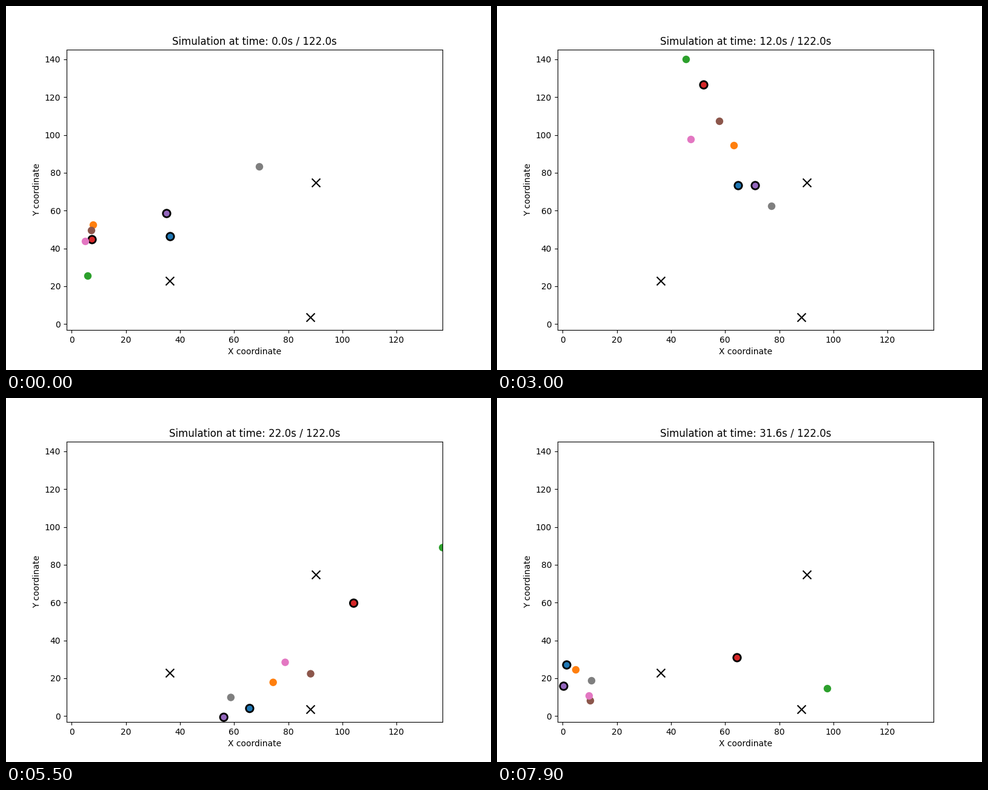
Recreate the animation shown at these times as a matplotlib script. Size 800x600 px, loop 8000 ms.

```python
import numpy as np
import matplotlib.pyplot as plt
from matplotlib.animation import FuncAnimation

FRAMES, INTERVAL = 80, 100
DT, T_END = 0.4, 122.0
XLIM, YLIM = (-1.9, 137), (-3.1, 145.1)
TARGETS = [(90.25, 74.75), (36.25, 22.75), (88.2, 3.6)]

# Each agent sweeps clockwise through a few waypoints (stage pixels)
KNOTS = np.array([0, 19, 30, 40, 48, 62, 79])
ROUTES = {
    "tab:blue": "271,380 286,305 398,296 477,369 461,465 322,518 115,440",
    "tab:orange": "144,361 197,230 391,230 507,304 492,397 368,508 130,448",
    "tab:green": "135,445 138,174 312,88 593,95 705,152 690,347 545,479",
    "tab:red": "142,385 163,162 341,130 525,156 576,236 543,423 396,428",
    "tab:purple": "265,342 333,292 426,296 475,381 452,485 248,526 110,475",
    "tab:brown": "141,370 176,198 367,190 549,249 559,359 415,517 154,499",
    "tab:pink": "131,388 171,234 320,220 473,252 498,338 389,510 152,491",
    "tab:gray": "418,265 433,293 453,330 454,383 439,451 283,510 156,466",
}
RINGED = {"tab:blue", "tab:red", "tab:purple"}


def parse(route):
    return [[float(v) for v in p.split(",")] for p in route.split()]


def to_data(px):
    """Stage pixels to axes units."""
    fx = (px[..., 0] - 100) / 620
    fy = (534 - px[..., 1]) / 462
    return np.stack([XLIM[0] + fx * np.ptp(XLIM),
                     YLIM[0] + fy * np.ptp(YLIM)], axis=-1)


def slopes(t, p):
    """Velocities of a smooth cubic that starts at rest and ends unbent."""
    h = np.diff(t)
    s = np.diff(p, axis=0) / h[:, None]
    n = len(t)
    a, b = np.eye(n), np.zeros_like(p)
    for i in range(1, n - 1):
        l, r = 1 / h[i - 1], 1 / h[i]
        a[i, i - 1:i + 2] = l, 2 * (l + r), r
        b[i] = 3 * (s[i - 1] * l + s[i] * r)
    a[-1, -2:] = 1, 2
    b[-1] = 3 * s[-1]
    return np.linalg.solve(a, b)


way = to_data(np.array([parse(r) for r in ROUTES.values()]))
way = way.transpose(1, 0, 2).reshape(len(KNOTS), -1)
speed = slopes(KNOTS, way)


def positions(step):
    k = min(np.searchsorted(KNOTS, step, side="right") - 1, len(KNOTS) - 2)
    h = KNOTS[k + 1] - KNOTS[k]
    u = (step - KNOTS[k]) / h
    ease = u * u * (3 - 2 * u)
    bend = speed[k] * u * (1 - u) ** 2 - speed[k + 1] * u * u * (1 - u)
    p = way[k] + (way[k + 1] - way[k]) * ease + h * bend
    return p.reshape(-1, 2)


fig, ax = plt.subplots(figsize=(8, 6), dpi=100)
ax.set(xlim=XLIM, ylim=YLIM, xlabel="X coordinate", ylabel="Y coordinate")
ax.scatter(*zip(*TARGETS), s=100, c="black", marker="x", linewidths=1.5)
dots = ax.scatter(*positions(0).T, s=80, c=list(ROUTES),
                  edgecolors=["black" if c in RINGED else "none" for c in ROUTES],
                  linewidths=[2 if c in RINGED else 0 for c in ROUTES])
title = ax.set_title("")


def update(i):
    dots.set_offsets(positions(i))
    title.set_text(f"Simulation at time: {i * DT:.1f}s / {T_END:.1f}s")
    return dots, title


anim = FuncAnimation(fig, update, frames=FRAMES, interval=INTERVAL,
                     init_func=lambda: update(0), repeat=True)
plt.show()
```
